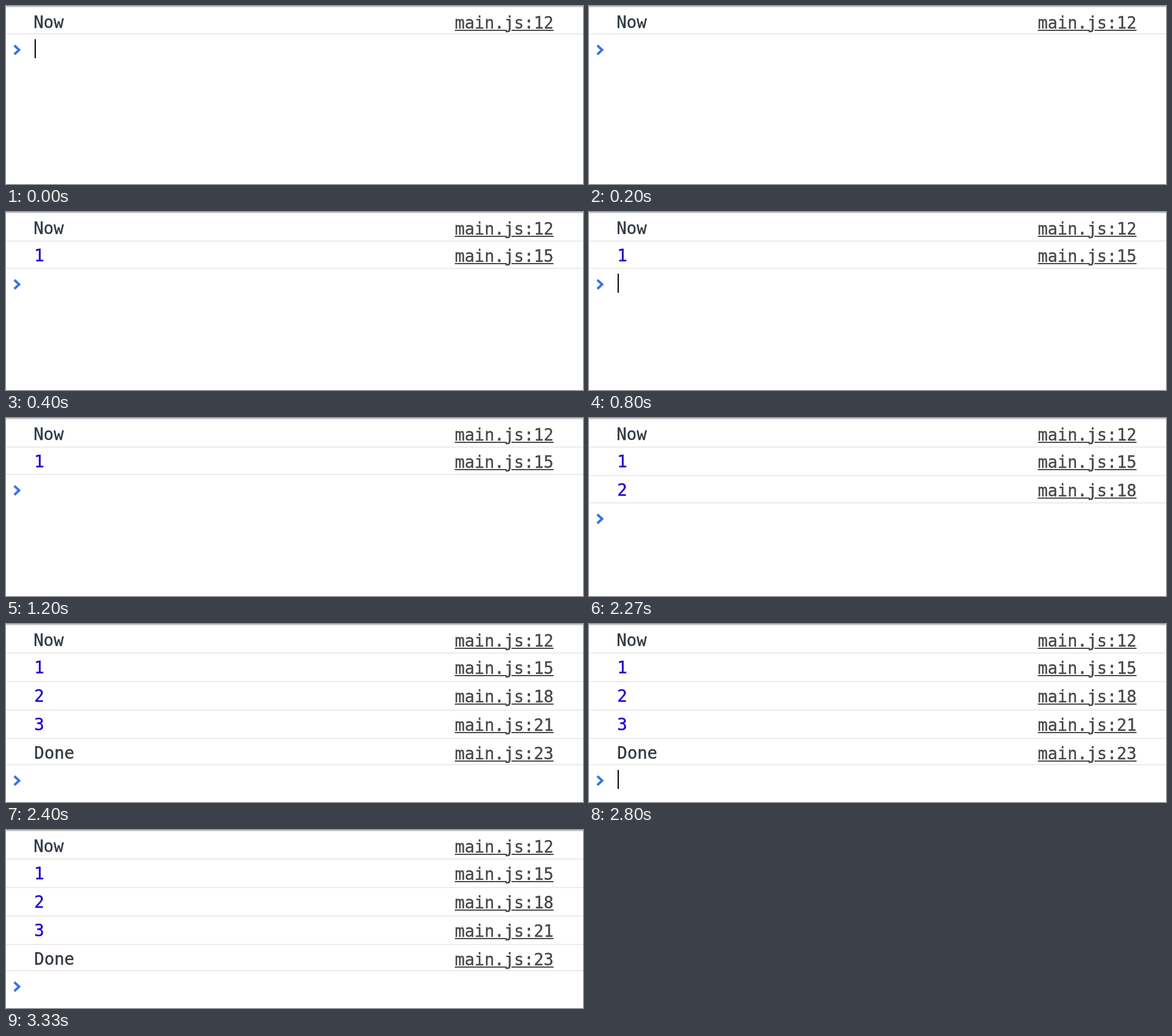
These frames come from a looping animation (968 by 300 pixels, 3590 ms). An HTML page:

```html
<!DOCTYPE html>
<html lang="en">
<head>
<meta charset="utf-8">
<title>Console</title>
<style>
  html, body { margin: 0; width: 100%; height: 100%; overflow: hidden; background: #fff; }
  #console {
    position: relative; width: 968px; height: 300px; overflow: hidden;
    font: 27.5px/32px "DejaVu Sans Mono", monospace; color: #303942;
    -webkit-text-stroke: 0.4px;
  }
  #console > *, .row > * { position: absolute; }
  .row { left: 0; top: 0; }
  .top, .line { left: 0; width: 968px; height: 2px; }
  .top { top: 0; background: #c9c9c9; }
  .line { background: #ebebeb; }
  .text { left: 47.3px; font-size: 28px; }
  .number { color: #1c00cf; }
  .link {
    left: 753px; color: #484848;
    text-decoration: underline; text-decoration-thickness: 2px; text-underline-offset: 2px;
  }
  #prompt { left: 0; top: 0; width: 60px; height: 48px; }
</style>
</head>
<body>
<div id="console">
  <div class="top"></div>
  <svg id="prompt" viewBox="0 0 60 48">
    <path d="M14 20.5L22 28L14 35.5" fill="none" stroke="#3574e6" stroke-width="4"/>
    <rect id="cursor" x="48" y="10" width="2" height="32"/>
  </svg>
</div>
<script>
const LOOP = 3590, BLINK = 533, FIRST_OFF = 130;
const stage = document.getElementById('console');
const promptMark = document.getElementById('prompt');
const cursor = document.getElementById('cursor');

function add(parent, className, text = '') {
  const el = document.createElement('div');
  el.className = className;
  el.textContent = text;
  return parent.appendChild(el);
}

const rows = [
  [0, 'Now', 12], [400, '1', 15], [1400, '2', 18], [2400, '3', 21], [2400, 'Done', 23]
].map(([start, value, lineNumber], i) => {
  const el = add(stage, 'row');
  const text = add(el, isNaN(value) ? 'text' : 'text number', value);
  const link = add(el, 'link', 'main.js:' + lineNumber);
  const line = add(el, 'line');
  text.style.top = link.style.top = (i ? 10 + 48 * i : 12) + 'px';
  if (!i) text.style.left = '46.2px';
  return { start, el, line };
});

function draw(t) {
  const last = rows.filter(row => t >= row.start).length - 1;
  const bottom = last === 4 ? 236 : 46 + 48 * last;
  rows.forEach((row, i) => {
    row.el.style.display = i <= last ? '' : 'none';
    row.line.style.top = (i < last ? 48 + 48 * i : bottom) + 'px';
  });
  promptMark.style.top = bottom + 'px';
  const blinkOn = Math.floor((t - FIRST_OFF) / BLINK) % 2 !== 0;
  cursor.style.display = blinkOn ? '' : 'none';
}

function tick() {
  draw(performance.now() % LOOP);
  requestAnimationFrame(tick);
}
tick();
</script>
</body>
</html>
```
